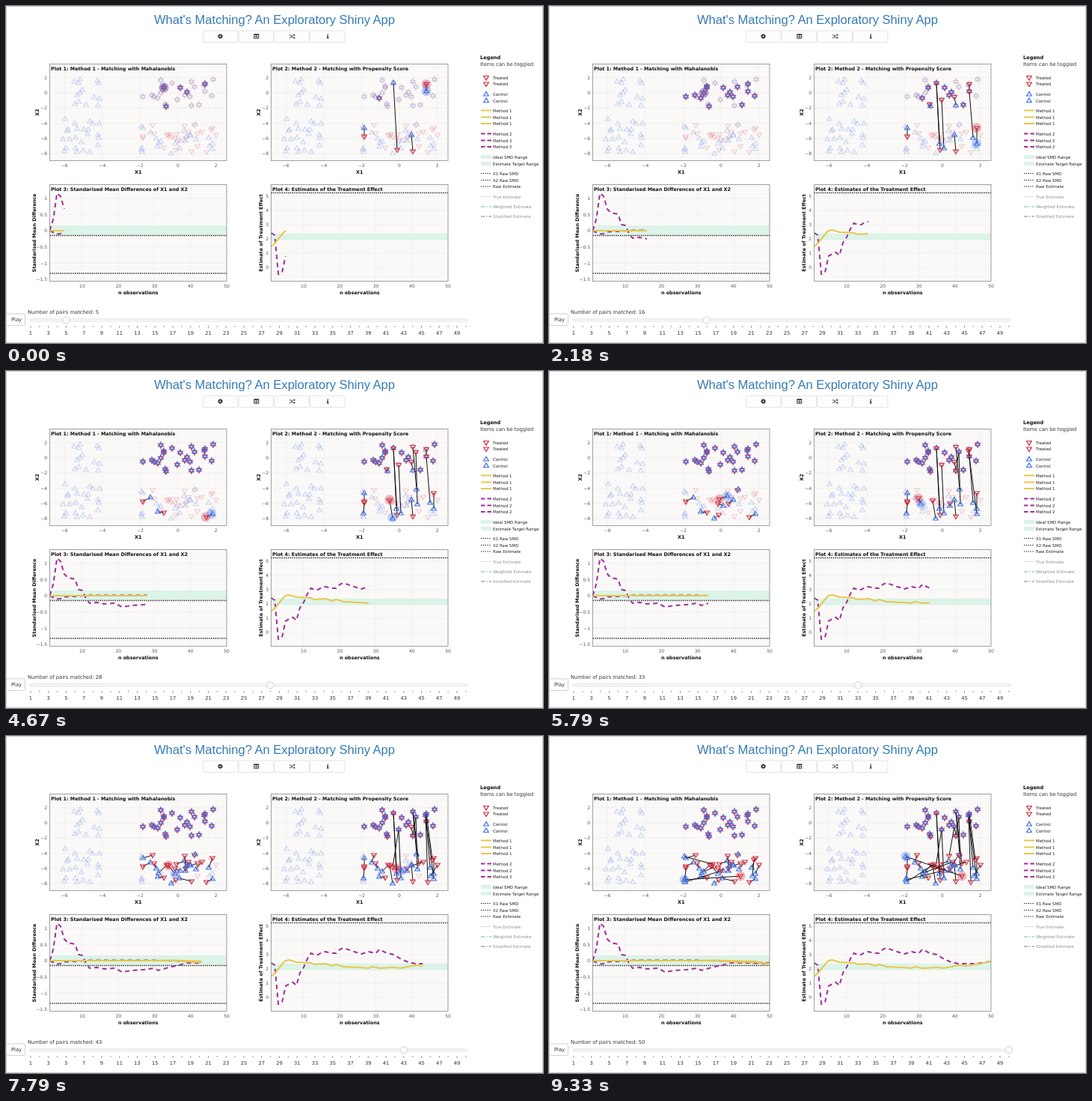
Animation of 718 by 450 pixels, one loop 9360 ms. Source, as an HTML page:

```html
<!DOCTYPE html>
<html lang="en">
<head>
<meta charset="utf-8">
<title>What's Matching?</title>
<style>
  html, body { margin: 0; width: 100%; height: 100%; overflow: hidden; background: #fff; }
  svg { display: block; font-family: "DejaVu Sans", Verdana, sans-serif; }
  .head { font: 16.54px "Liberation Sans", Arial, sans-serif; fill: #337ab7; }
  .bold { font-weight: bold; font-size: 6.42px; fill: #111; }
  .tick { font-size: 6px; fill: #555; }
  .label { font-size: 6.74px; fill: #333; }
  .key { font-size: 5.45px; fill: #222; }
  .mid { text-anchor: middle; }
  .end { text-anchor: end; }
</style>
</head>
<body>
<svg id="stage" width="718" height="450" viewBox="0 0 718 450"></svg>
<script>
const LOOP = 9360, SHIFT = 296, LEFT = 58.5, STEP = 4.827;
const RED = '#d42c40', BLUE = '#3f6fe8', GOLD = '#e8c74c', PURPLE = '#a02f9c';
const TREATED = 'M-3.3-2H3.3L0 3.6Z', CONTROL = 'M-3.3 2H3.3L0-3.6Z';

// Time at which each number of matched pairs is reached
const PACE = [[5, -177], [6, 30], [23, 3540], [39, 6890], [50, 9120], [51, 9360]];

const toPoints = a => a.reduce((r, v, i) => (i % 2 ? r[r.length - 1].push(v) : r.push([v]), r), []);

const shared = toPoints([
  233,109, 242,115, 266,104, 214,134, 211,109, 183,121, 258,132, 246,121, 252,108,
  195,119, 266,114, 203,123, 275,120, 239,119, 211,107, 207,116, 222,103, 277,98,
  229,125, 265,106, 207,99, 248,133, 248,101, 198,121, 213,131]);
const treatedLow = toPoints([
  183,174, 211,189, 268,195, 227,192, 252,159, 226,177, 240,177, 228,171, 196,159,
  198,170, 248,194, 256,170, 215,172, 239,160, 276,163, 262,168, 244,168, 217,173,
  281,172, 221,175, 219,171, 274,165, 230,180, 183,176, 256,187]);
const controlLow = toPoints([
  193,169, 203,188, 276,191, 221,197, 253,158, 233,180, 246,172, 238,167, 183,163,
  201,177, 232,190, 247,173, 204,183, 240,180, 271,176, 254,178, 241,174, 226,184,
  276,184, 207,181, 181,161, 272,187, 182,195, 182,190, 181,192]);
const unmatched = toPoints([
  91,101, 99,98, 122,100, 124,103, 102,112, 99,116, 95,119, 118,122, 125,124, 97,128,
  92,131, 107,132, 123,133, 97,103, 79,151, 92,157, 112,154, 116,157, 125,157, 83,165,
  95,164, 104,165, 110,165, 82,167, 123,172, 76,178, 85,178, 93,176, 101,182, 124,176,
  80,190, 93,190, 95,195, 103,193, 78,194, 123,186, 112,195, 109,171]);

const treated = [...shared.map(([x, y]) => [x, y + .4]), ...treatedLow];
const control = [...shared.map(([x, y]) => [x, y - .4]), ...controlLow];

// Pairs of [treated, control] indices in matching order
const byDistance = treated.map((_, i) => [i, i]);
const byScore = toPoints([
  11,11, 25,33, 28,16, 35,31, 2,10, 4,4, 0,0, 1,1, 6,6, 24,3,
  7,21, 18,35, 10,39, 16,42, 13,13, 39,43, 23,23, 48,48, 8,40, 9,9,
  17,17, 5,5, 12,12, 20,20, 22,29, 15,15, 14,14, 42,28, 19,27, 3,24,
  21,8, 31,38, 34,34, 33,25, 36,22, 27,19, 44,18, 46,2, 43,46, 40,36,
  26,26, 37,44, 30,30, 32,32, 38,7, 41,37, 45,47, 29,41, 47,49, 49,45]);

// Curves: [pairs matched, y], plot 3 first
const curves = [
  { color: PURPLE, dx: 0, pts: [1,300, 2,284, 3,250, 4,254, 5,271, 6,276, 8,278, 9,292, 10,293,
    11,303, 12,310, 14,309, 16,311, 19,310, 21,315, 24,313, 27,312, 30,310, 31,313, 34,309,
    36,307, 39,303, 44,303, 50,304] },
  { color: PURPLE, dx: 0, pts: [1,300, 3,304.5, 4,304, 5,301.5, 8,301, 12,299.5, 30,299.5, 40,301, 50,303] },
  { color: GOLD, dx: 0, pts: [1,300, 30,300, 35,299.4, 41,300.5, 46,301, 50,304.5] },
  { color: GOLD, dx: 0, pts: [1,300, 36,300, 41,302, 46,302, 50,304] },
  { color: PURPLE, dx: SHIFT, pts: [1,303, 2,306, 3,358, 4,356, 5,334, 6,331, 7,329, 8,333, 9,316,
    10,309, 11,298, 12,290, 13,292, 14,292, 15,289, 16,288, 18,290, 19,290, 20,285, 21,283, 24,288,
    26,291, 28,288, 30,290, 31,285, 33,290, 35,292, 37,298, 39,302, 41,304, 46,304, 50,301] },
  { color: GOLD, dx: SHIFT, pts: [1,321, 2,317, 3,311, 4,305, 5,300, 6,299, 8,302, 12,303, 13,305,
    16,304, 18,307, 19,305, 21,308, 25,309, 28,310, 29,308, 31,310, 35,309, 37,310, 41,306,
    43,307, 47,304, 50,301] }
];
curves.forEach(c => c.pts = toPoints(c.pts));

const text = (x, y, s, cls, extra = '') => `<text x="${x}" y="${y}" class="${cls}" ${extra}>${s}</text>`;
const line = (x1, y1, x2, y2, color, w = 1, extra = '') =>
  `<path d="M${x1} ${y1}L${x2} ${y2}" stroke="${color}" stroke-width="${w}" fill="none" ${extra}/>`;
const rect = (x, y, w, h, fill, extra = '') =>
  `<rect x="${x}" y="${y}" width="${w}" height="${h}" fill="${fill}" ${extra}/>`;
const mark = ([x, y], d, color, o = 1) =>
  `<path d="${d}" transform="translate(${x} ${y})" fill="none" stroke="${color}" stroke-width="1.2" opacity="${o}"/>`;
const num = v => String(v).replace('-', '−');
const dots = 'stroke-dasharray="1.4 1.4"';
const dashes = 'stroke-dasharray="6 4.6"';

function panel(dx, top, title, xName, yName, xTicks, yTicks, inner) {
  const x = LEFT + dx, h = 129, low = top + h, cx = x + 118.25;
  const yx = dx ? x - 12 : x - 19;
  return rect(x, top, 236.5, h, '#faf9f8')
    + xTicks.map(([v, p]) => line(p + dx, top, p + dx, low, '#eeeeee', .7)
      + text(p + dx, low + 8.5, num(v), 'tick mid')).join('')
    + yTicks.map(([v, p]) => line(x, p, x + 236.5, p, '#eeeeee', .7)
      + text(x - 3.5, p + 2.2, num(v), 'tick end')).join('')
    + inner
    + rect(x, top, 236.5, h, 'none', 'stroke="#8a8a8a" stroke-width=".8"')
    + text(x + 1.5, top + 8.3, title, 'bold')
    + text(cx, low + 17, xName, 'bold mid')
    + text(0, 0, yName, 'bold mid', `transform="translate(${top < 200 ? x - 14.5 : yx} ${top + h / 2}) rotate(-90)"`);
}

const ticks = (vals, f) => vals.map(v => [v, f(v)]);
const xAxis = ticks([-6, -4, -2, 0, 2], v => 230 + v * 25.3);
const yAxis = ticks([2, 0, -2, -4, -6, -8], v => 116 - v * 10.13);
const nAxis = ticks([10, 20, 30, 40, 50], v => LEFT + (v - 1) * STEP);

function scatter(dx, pairs, id) {
  const faint = treated.map(p => mark(p, TREATED, RED, .22)).join('')
    + control.concat(unmatched).map(p => mark(p, CONTROL, BLUE, .25)).join('');
  const links = pairs.map(([a, b]) => {
    const [p, q] = [treated[a], control[b]];
    return `<g class="${id}">${line(...p, ...q, '#111', 1)}${mark(p, TREATED, RED, .9)}${mark(q, CONTROL, BLUE, .9)}</g>`;
  }).join('');
  const spot = (k, color) => `<circle id="${id}${k}" r="6.5" fill="${color}" opacity=".32"/>`;
  return `<g transform="translate(${dx} 0)">${faint}${links}${spot('T', RED)}${spot('C', BLUE)}</g>`;
}

const curveTags = dx => curves.map((c, i) => c.dx !== dx ? '' :
  `<polyline id="curve${i}" fill="none" stroke="${c.color}" stroke-width="2" ${c.color === PURPLE ? dashes : ''}/>`).join('');
const raw = (dx, y) => line(LEFT + dx, y, LEFT + dx + 236.5, y, '#222', 1.3, dots);
const band = (dx, y, h) => rect(LEFT + dx, y, 236.5, h, '#dcf3e8');

function legend() {
  const key = (y, s, sample, o = 1) => `<g opacity="${o}">${sample}${text(651, y + 2, s, 'key')}</g>`;
  const stroke = (y, color, w, dash = '') => line(635, y, 649, y, color, w, dash);
  const rows = (ys, names, sample, o) => ys.map((y, i) => key(y, names[i] || names[0], sample(y), o)).join('');
  return text(634, 71.3, 'Legend', 'bold', 'style="font-size:6.6px"')
    + text(634, 79.8, 'Items can be toggled', 'label')
    + rows([95.5, 104], ['Treated'], y => mark([642, y], TREATED, RED))
    + rows([118, 126.5], ['Control'], y => mark([642, y], CONTROL, BLUE))
    + rows([139.5, 148.5, 157], ['Method 1'], y => stroke(y, GOLD, 2))
    + rows([170.5, 179.5, 188], ['Method 2'], y => stroke(y, PURPLE, 2, 'stroke-dasharray="5.5 3"'))
    + rows([201.5, 210.5], ['Ideal SMD Range', 'Estimate Target Range'], y => rect(635, y - 2.5, 14, 5, '#dcf3e8'))
    + rows([223.5, 232.5, 241], ['X1 Raw SMD', 'X2 Raw SMD', 'Raw Estimate'], y => stroke(y, '#222', 1.2, dots))
    + key(254.5, 'True Estimate', stroke(254.5, '#777', 1, dots), .5)
    + key(268, 'Weighted Estimate', stroke(268, '#38a3c8', 1.5, 'stroke-dasharray="5 2 1.5 2"'), .5)
    + key(281, 'Stratified Estimate', stroke(281, '#555', 1.5, 'stroke-dasharray="5 2 1.5 2"'), .5);
}

function buttons() {
  const box = [0, 1, 2, 3].map(i => rect(263.5 + i * 47.6, 33, 46.6, 15.5, '#fdfdfd',
    'rx="1.5" stroke="#dedede" stroke-width=".8"')).join('');
  const gear = `<circle cx="286.5" cy="40.5" r="1.9" fill="none" stroke="#333" stroke-width="1.7"/>
    <circle cx="286.5" cy="40.5" r="2.8" fill="none" stroke="#333" stroke-width="1" stroke-dasharray="1.1 1.1"/>`;
  const table = rect(331.8, 37.8, 6, 5.4, 'none', 'stroke="#333" stroke-width=".9"')
    + rect(331.8, 37.8, 6, 1.2, '#333') + line(334.8, 38, 334.8, 43, '#333', .8) + line(332, 41, 338, 41, '#333', .8);
  const shuffle = `<path d="M379 38.8h1.5l3 3.6h2M379 42.4h1.5l3-3.6h2" fill="none" stroke="#333" stroke-width=".9"/>
    <path d="M385 37.3l1.7 1.5-1.7 1.5zM385 40.9l1.7 1.5-1.7 1.5z" fill="#333"/>`;
  const info = '<path d="M429.6 37.5h1.5v1.3h-1.5zM429 39.5h2v3h.6v.9h-2.8v-.9h.7v-2h-.5z" fill="#333"/>';
  return box + gear + table + shuffle + info;
}

const slideX = n => 33 + (n - 1) * 11.875;

function slider() {
  let s = rect(.5, 411, 25, 15.5, '#fff', 'rx="2" stroke="#ccc" stroke-width=".9"')
    + text(14, 421.4, 'Play', 'label mid')
    + '<text id="count" class="label" x="29" y="411.2"></text>'
    + rect(32, 418, 585, 3, '#fafafa', 'rx="1.5" stroke="#d5d5d5" stroke-width=".7"');
  for (let n = 1; n <= 50; n++) {
    const x = slideX(n);
    s += line(x, 427, x, n % 2 ? 430 : 429, '#555', .6);
    if (n % 2) s += text(x, 438.6, n, 'label mid');
  }
  return s + '<circle id="knob" cy="419.5" r="4.7" fill="#fafafa" stroke="#c9c9c9" stroke-width=".8"/>';
}

const $ = id => document.getElementById(id);
$('stage').innerHTML = rect(0, 0, 718, 450, '#fff')
  + text(359, 23.8, 'What\'s Matching? An Exploratory Shiny App', 'head mid')
  + buttons()
  + panel(0, 77.5, 'Plot 1: Method 1 - Matching with Mahalanobis', 'X1', 'X2', xAxis, yAxis, scatter(0, byDistance, 'a'))
  + panel(SHIFT, 77.5, 'Plot 2: Method 2 - Matching with Propensity Score', 'X1', 'X2', xAxis, yAxis, scatter(SHIFT, byScore, 'b'))
  + panel(0, 238.5, 'Plot 3: Standarised Mean Differences of X1 and X2', 'n observations', 'Standarised Mean Difference',
    nAxis, ticks([1, .5, 0, -.5, -1, -1.5], v => 300 - v * 43.3),
    band(0, 293, 13) + raw(0, 306.5) + raw(0, 357) + curveTags(0))
  + panel(SHIFT, 238.5, 'Plot 4: Estimates of the Treatment Effect', 'n observations', 'Estimate of Treatment Effect',
    nAxis, ticks([5, 4, 3, 2, 1, 0], v => 349 - v * 19),
    band(SHIFT, 303.7, 9) + raw(SHIFT, 249.5) + curveTags(SHIFT))
  + legend() + slider()
  + rect(.5, .5, 717, 449, 'none', 'stroke="#cfcfcf"');

const plots = [['a', byDistance], ['b', byScore]].map(([id, pairs]) =>
  ({ id, pairs, groups: [...document.querySelectorAll('.' + id)] }));
const mix = (a, b, k) => a + (b - a) * k;
const ease = k => k < .5 ? 4 * k ** 3 : 1 - 4 * (1 - k) ** 3;

function pairsAt(t) {
  const i = PACE.findIndex(p => p[1] > t);
  const [[n0, t0], [n1, t1]] = [PACE[i - 1], PACE[i]];
  return mix(n0, n1, (t - t0) / (t1 - t0));
}

function curveTo(pts, n) {
  const i = pts.findIndex(p => p[0] >= n), [b, a] = [pts[i], pts[i - 1]];
  return [...pts.slice(0, i), [n, mix(a[1], b[1], (n - a[0]) / (b[0] - a[0]))]];
}

function draw(t) {
  const f = pairsAt(t), n = Math.min(50, Math.floor(f));
  const k = ease(Math.min(1, (f - n) * 2.08));
  $('count').textContent = 'Number of pairs matched: ' + n;
  $('knob').setAttribute('cx', mix(slideX(n - 1), slideX(n), k));
  curves.forEach((c, i) => $('curve' + i).setAttribute('points',
    curveTo(c.pts, n).map(([m, y]) => `${LEFT + c.dx + (m - 1) * STEP},${y}`).join(' ')));
  for (const { id, pairs, groups } of plots) {
    groups.forEach((g, i) => g.setAttribute('opacity', i < n - 1 ? 1 : i === n - 1 ? k : 0));
    [['T', treated], ['C', control]].forEach(([s, set], j) => {
      const p = set[pairs[n - 2][j]], q = set[pairs[n - 1][j]];
      $(id + s).setAttribute('cx', mix(p[0], q[0], k));
      $(id + s).setAttribute('cy', mix(p[1], q[1], k));
    });
  }
}

function tick() {
  draw(performance.now() % LOOP);
  requestAnimationFrame(tick);
}
tick();
</script>
</body>
</html>
```
